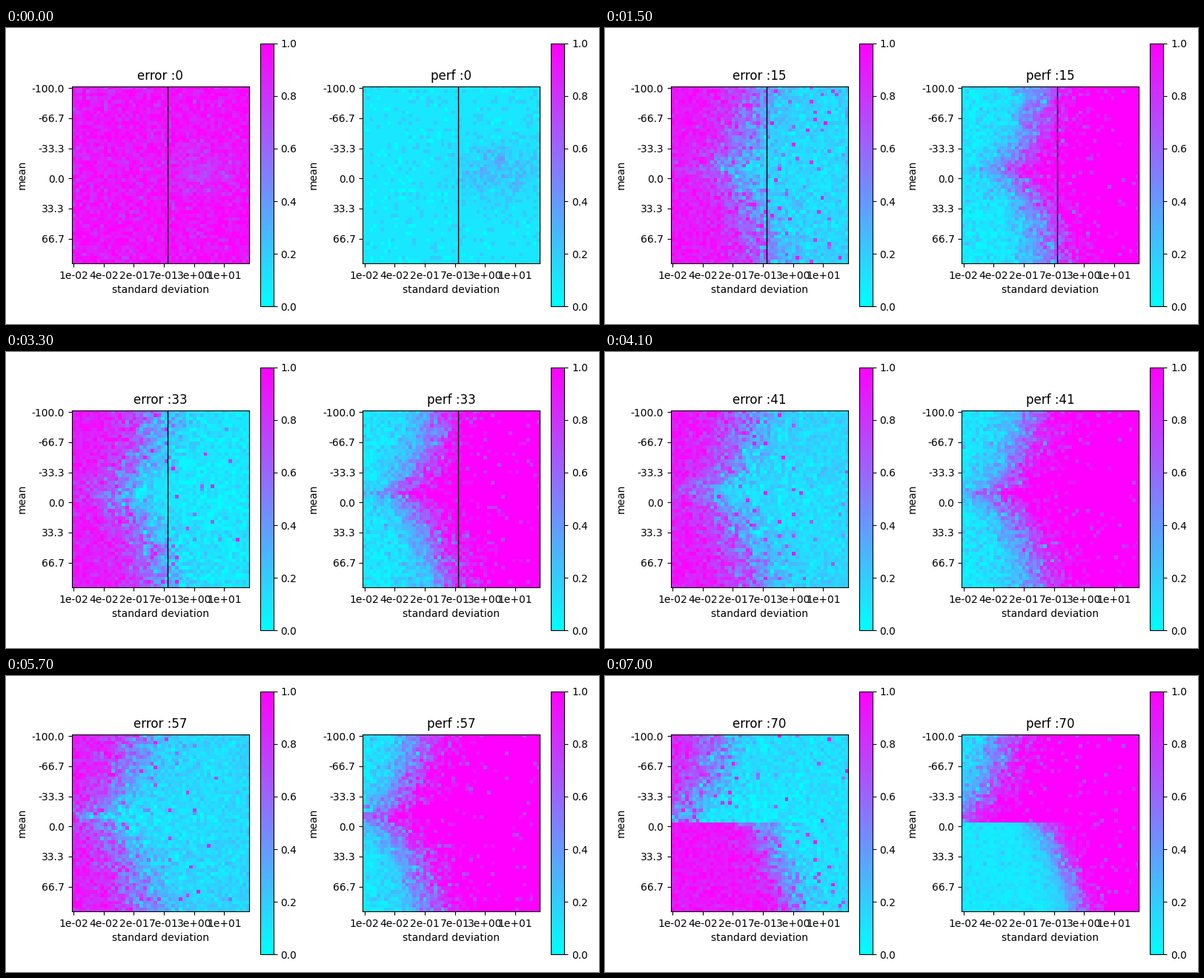
Write a matplotlib script that moves like this. It is 800 px wide and 400 px high and loops after 7.1 s.

```python
import numpy as np
import matplotlib.pyplot as plt
from matplotlib.animation import FuncAnimation

N = 50
FRAMES = 71
LINE_END = 40     # the marker line is gone from here on
SPLIT_START = 67  # the lower half loses its skill here

STAGES = [0, 8, 21, 33, 50, 64, 70]
EDGE = [.52, .48, .46, .43, .37, .30, .25]
FLOOR = [.30, .16, .09, .08, .17, .08, .10]
OUTLIERS = [0, .035, .02, .012, .006, .01, .015]

cell = (np.arange(N) + .5) / N
u, v = np.meshgrid(cell, 2 * cell - 1)


def sigmoid(x):
    return 1 / (1 + np.exp(-x))


def stage(k, values):
    return np.interp(k, STAGES, values)


def skill_edge(k):
    """Column (0..1) at which each row passes from failing to solved."""
    bend = np.interp(k, [8, 50], [.24, .30])
    edge = stage(k, EDGE) + bend * np.log10(np.abs(v + .06) + .09) + .02 * v
    if k >= SPLIT_START:
        low_half = .44 + .23 * np.clip(v, 0, 1) ** .8
        edge = np.where(v > 0, low_half, edge)
    return edge


def start_fields(rng):
    blob = np.exp(-((u - .74) / .2) ** 2 - ((v + .05) / .28) ** 2)
    error = .93 + .03 * u + .06 * rng.standard_normal((N, N)) - .13 * blob
    error -= np.where(rng.random((N, N)) < .2, .1, 0)
    perf = np.full((N, N), .1)
    p = rng.random((N, N))
    perf[p < .1 * (1 - .7 * u)] = .01
    near = np.exp(-((v + .05) / .45) ** 2)
    perf[p > .95 - .1 * u - .22 * near * u] = .2
    perf += blob * rng.uniform(0, .3, (N, N))
    return error, perf


def trained_fields(k, rng):
    edge = skill_edge(k)
    width = np.full((N, N), .07)
    spread = np.full((N, N), .6)
    if k >= SPLIT_START:
        width[v > 0] = .045
        spread[v > 0] = .35
    learned = 1 - np.exp(-k / 1.5)
    # misses get rarer with distance past the edge
    tail = np.exp(-np.clip(u - edge, 0, 1) / .13)
    solved = u > edge

    s = learned * sigmoid((u - edge) / width)
    p = .1 + .9 * s
    perf = p + (rng.binomial(10, p) / 10 - p) * (spread + .4 * s)
    miss = (rng.random((N, N)) < .04 + .3 * tail) & solved
    perf[miss] -= rng.uniform(.08, .3, miss.sum())

    e = learned * sigmoid((u - edge - .03) / (width * 1.2))
    floor = stage(k, FLOOR) * (.8 + .4 * u + .2 * np.abs(v))
    error = .92 + (floor - .92) * e
    error += (.055 + .42 * e * (1 - e)) * rng.standard_normal((N, N))
    odd = (rng.random((N, N)) < stage(k, OUTLIERS) + .22 * tail) & solved
    error[odd] = rng.uniform(.35, .95, odd.sum())
    return error, perf


def fields(k):
    rng = np.random.default_rng(500 + k)
    pair = start_fields(rng) if k == 0 else trained_fields(k, rng)
    return [np.clip(f, 0, 1) for f in pair]


fig, axes = plt.subplots(1, 2, figsize=(8, 4), dpi=100)
ticks = 8.5 * np.arange(6)
means = ["-100.0", "-66.7", "-33.3", "0.0", "33.3", "66.7"]
deviations = [f"{d:.0e}" for d in .01 * 4.2 ** np.arange(6)]

images, lines = [], []
for ax in axes:
    im = ax.imshow(np.zeros((N, N)), cmap="cool", vmin=0, vmax=1)
    fig.colorbar(im, ax=ax)
    ax.set_xticks(ticks, deviations)
    ax.set_yticks(ticks, means)
    ax.set_xlabel("standard deviation")
    ax.set_ylabel("mean")
    images.append(im)
    lines.append(ax.axvline(26.5, color="black", lw=1))


def update(k):
    for ax, im, line, name, data in zip(axes, images, lines,
                                        ("error", "perf"), fields(k)):
        im.set_data(data)
        ax.set_title(f"{name} :{k}")
        line.set_visible(k < LINE_END)
    return images


update(0)
for _ in range(2):  # the second pass settles the colorbar widths
    fig.tight_layout()

anim = FuncAnimation(fig, update, frames=FRAMES, interval=100,
                     init_func=lambda: update(0), repeat=True,
                     repeat_delay=0, blit=False)
plt.show()
```
